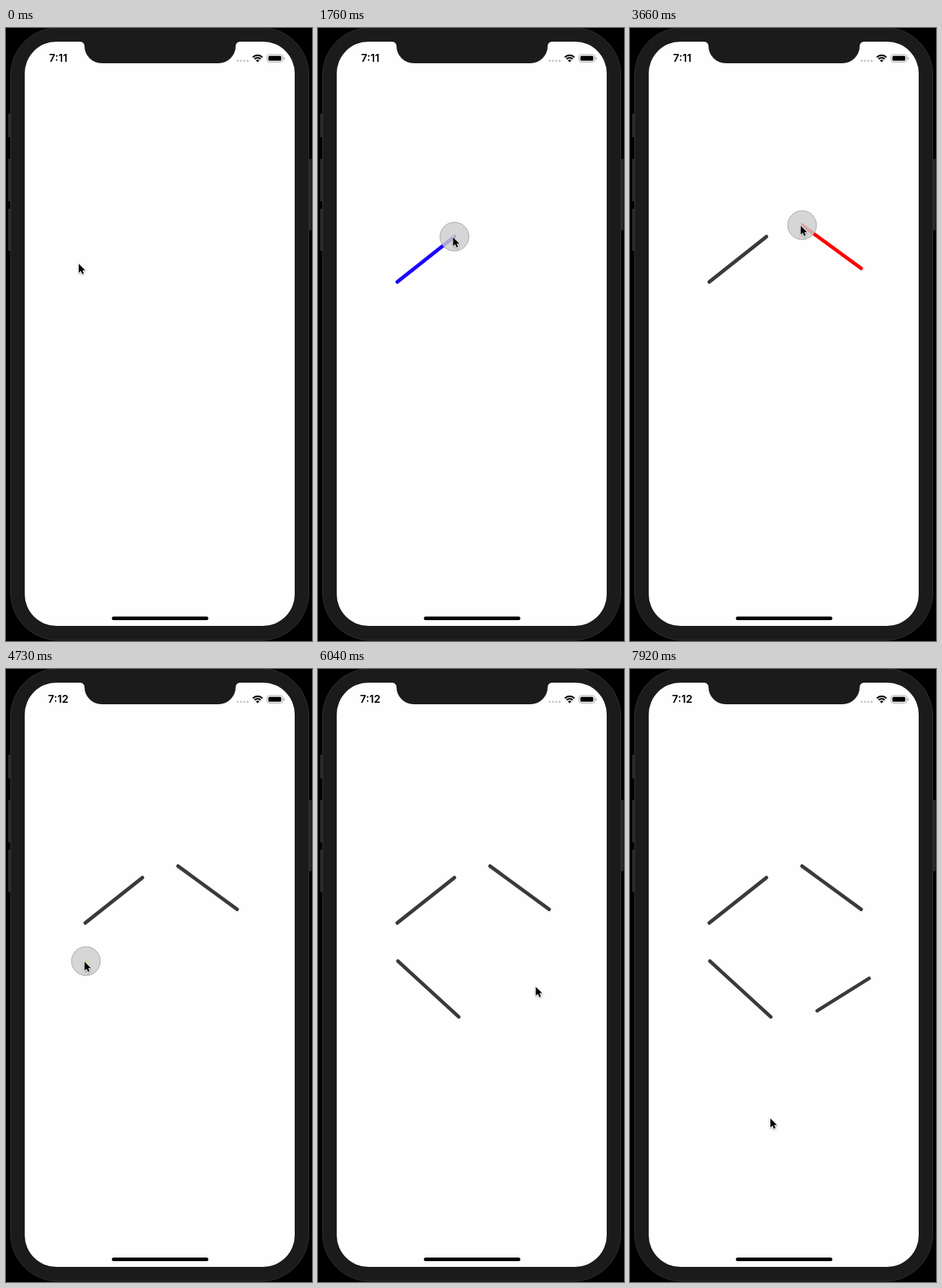
These frames come from a looping animation (425 px wide and 852 px high, 8000 ms). An HTML page:

```html
<!DOCTYPE html>
<html lang="en">
<head>
<meta charset="utf-8">
<title>Line drawing</title>
<style>
  html, body { margin: 0; width: 100%; height: 100%; overflow: hidden; background: #000; }
  svg { display: block; width: 425px; height: 852px; }
  text { font: 600 15px Inter, "Liberation Sans", sans-serif; text-anchor: middle; }
  #strokes { stroke-width: 5; stroke-linecap: round; }
</style>
</head>
<body>
<svg viewBox="0 0 425 852">
  <g fill="#2a2a2a">
    <rect x="3" y="119" width="6" height="33" rx="1"/>
    <rect x="3" y="182" width="6" height="59" rx="1"/>
    <rect x="3" y="251" width="6" height="59" rx="1"/>
    <rect x="418" y="182" width="6.5" height="99" rx="1"/>
  </g>
  <rect x="6.5" y="-.5" width="414" height="851.5" rx="66" fill="#1b1b1b" stroke="#303030"/>
  <rect x="26" y="19" width="375" height="812" rx="44" fill="#fefefe"/>
  <path fill="#1b1b1b" d="M103 18V19a6 6 0 0 1 6 6a24 24 0 0 0 24 24H295a24 24 0 0 0 24 -24a6 6 0 0 1 6 -6V18Z"/>
  <text id="clock" x="72.6" y="47"></text>
  <path d="M321.7 45.6h14" stroke="#cbcbcb" stroke-width="3.2" stroke-linecap="round" stroke-dasharray="0 4.6"/>
  <g fill="none" stroke="#000" stroke-width="2.3">
    <path d="M342.9 40.7a9.3 9.3 0 0 1 13.2 0"/>
    <path d="M345.3 43.1a5.9 5.9 0 0 1 8.4 0"/>
  </g>
  <path d="M349.5 47.6l-2.5 -2.5a3.6 3.6 0 0 1 5 0Z"/>
  <rect x="362.5" y="37" width="22" height="10.4" rx="3" fill="none" stroke="#a8a8a8"/>
  <rect x="364.4" y="38.8" width="18" height="6.8" rx="1.6"/>
  <path fill="#a8a8a8" d="M385.7 40.2Q387.2 40.8 387.2 42.2T385.7 44.2Z"/>
  <rect x="147" y="818" width="134" height="5" rx="2.5"/>
  <g id="strokes"></g>
  <circle id="touch" r="20" fill="#cdcdcd" fill-opacity=".82" stroke="#a6a6a6"/>
  <g id="cursor">
    <path d="M0 .8V14L3.1 11.2L5.2 16L7.6 15L5.5 10.3H9.6Z" transform="scale(.94)"
      stroke="#fff" stroke-width="1.8" paint-order="stroke" style="filter: drop-shadow(0 1px 1px #0005)"/>
  </g>
</svg>
<script>
// Durations inside the scene are counted in ticks, the steps at which the screen refreshes.
const LOOP = 8000, TICK = 118.5, PHASE = 26;
const GLIDE = 4.5;   // hover from one line to the next
const REST = 1.5;    // pause at the end of a line
const LEAD = 0.4;    // how far the pointer runs ahead of the finger
const CLOCK_TICK = 36;

const home = [103, 327], exit = [197, 624], exitVia = [150, 610];

// The finger lands at `down` and drags from `start` to `end`; the pointer hovers in by way of `via`.
const strokes = [
  { color: "#1c00ff", via: [106, 340], from: [110, 353], to: [189.5, 290], down: 7, start: 8, end: 15 },
  { color: "#ff0000", via: [226, 596], from: [321, 334], to: [239, 274], down: 24, start: 24, end: 29.5 },
  { color: "#ffff00", via: [150, 400], from: [111, 406], to: [195.5, 483.5], down: 38, start: 41, end: 46.3 },
  { color: "#06ff00", via: [264, 457], from: [332, 430], to: [260, 475], down: 52, start: 52.8, end: 59.4 }
];

const byId = id => document.getElementById(id);
const set = (el, attrs) => { for (const k in attrs) el.setAttribute(k, attrs[k]); };
const mix = (a, b, u) => a.map((v, i) => v + (b[i] - v) * u);
const curve = (a, via, b, u) => mix(mix(a, via, u), mix(via, b, u), u);
const ease = (t, a, b) => {
  const u = Math.min(1, Math.max(0, (t - a) / (b - a)));
  return u * u * (3 - 2 * u);
};
const dragAt = (s, tick) => mix(s.from, s.to, ease(tick, s.start, s.end));

for (const s of strokes) {
  s.line = document.createElementNS("http://www.w3.org/2000/svg", "line");
  set(s.line, { x1: s.from[0], y1: s.from[1] });
  byId("strokes").append(s.line);
}

function pointerAt(tick) {
  let spot = home, leave = 1;
  const hover = (via, to) => curve(spot, via, to, ease(tick, leave, leave + GLIDE));
  for (const s of strokes) {
    if (tick < s.down) return hover(s.via, s.from);
    spot = s.to;
    leave = s.end + REST;
    if (tick < leave) return dragAt(s, tick + LEAD);
  }
  return hover(exitVia, exit);
}

function draw(now) {
  const tick = Math.floor((now % LOOP + PHASE) / TICK);
  let finger = null;
  for (const s of strokes) {
    const tip = dragAt(s, tick);
    const active = tick >= s.down && tick <= s.end + REST;
    if (active) finger = tip;
    set(s.line, {
      x2: tip[0], y2: tip[1],
      stroke: active ? s.color : "#3a3a3c",
      visibility: tick >= s.down ? "visible" : "hidden"
    });
  }
  set(byId("touch"), { visibility: finger ? "visible" : "hidden" });
  if (finger) set(byId("touch"), { cx: finger[0], cy: finger[1] });
  const [x, y] = pointerAt(tick);
  set(byId("cursor"), { transform: `translate(${x - 2} ${y})` });
  byId("clock").textContent = tick < CLOCK_TICK ? "7:11" : "7:12";
}

const begin = performance.now();
function frame() {
  draw(performance.now() - begin);
  requestAnimationFrame(frame);
}
frame();
</script>
</body>
</html>
```
